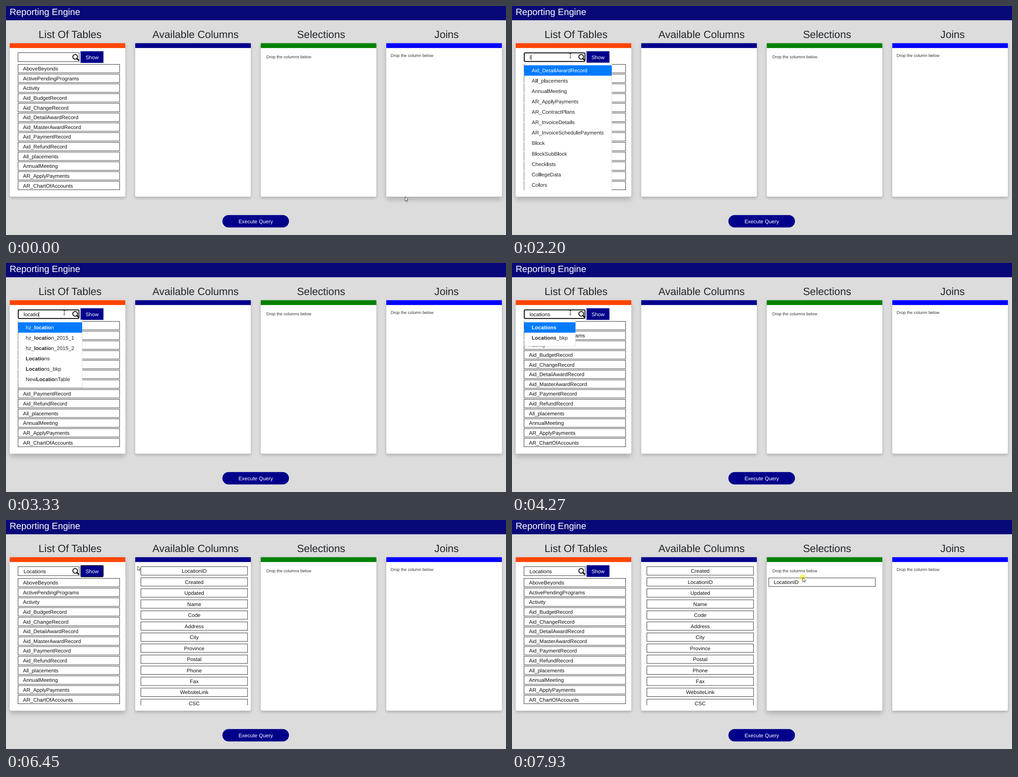
An HTML page with a canvas that plays this animation: 1103x508 px, repeating every 8 s.

```html
<!DOCTYPE html>
<html lang="en">
<head>
<meta charset="utf-8">
<title>Reporting Engine</title>
<style>
html, body { margin: 0; width: 100%; height: 100%; overflow: hidden; background: #dcdcdc; }
canvas { display: block; }
</style>
</head>
<body>
<canvas id="stage" width="1103" height="508"></canvas>
<script>
const ctx = document.getElementById('stage').getContext('2d');
ctx.textRendering = 'geometricPrecision';
const LOOP = 8000;
const FAMILY = '"Liberation Sans", Arial, sans-serif';
const BODY = 11.52;
const BLUE = '#007bff';
const NAVY = '#00008b';
const BOX_H = 18.7;

const panels = [
  ['List Of Tables', '#ff4500'],
  ['Available Columns', NAVY],
  ['Selections', '#008000'],
  ['Joins', '#0000ff']
].map(([title, color], i) => ({ title, color, x: 8.2 + i * 276.9 }));
const PANEL = { w: 255, top: 82.5, body: 93.2, bottom: 423 };

const tables = ['AboveBeyonds', 'ActivePendingPrograms', 'Activity', 'Aid_BudgetRecord',
  'Aid_ChangeRecord', 'Aid_DetailAwardRecord', 'Aid_MasterAwardRecord', 'Aid_PaymentRecord',
  'Aid_RefundRecord', 'All_placements', 'AnnualMeeting', 'AR_ApplyPayments', 'AR_ChartOfAccounts'];
const columns = ['LocationID', 'Created', 'Updated', 'Name', 'Code', 'Address', 'City',
  'Province', 'Postal', 'Phone', 'Fax', 'WebsiteLink', 'CSC'];

// Suggestions: the first letter gives a capped list, later ones filter the rest.
const firstHits = ['Aid_DetailAwardRecord', 'All_placements', 'AnnualMeeting', 'AR_ApplyPayments',
  'AR_ContractPlans', 'AR_InvoiceDetails', 'AR_InvoiceSchedulePayments', 'Block',
  'BlockSubBlock', 'Checklists', 'CollegeData', 'Colors'];
const laterHits = ['Block', 'BlockSubBlock', 'Colors', 'DownloadLog', 'EmailLog', 'hz_location',
  'hz_location_2015_1', 'hz_location_2015_2', 'Locations', 'Locations_bkp', 'NewLocationTable',
  'UploadLog', 'X_TEC_ARByStudentView_Local'];

const WORD = 'locations';
const keyTimes = [2200, 2520, 2690, 2770, 3090, 3170, 3330, 3560, 3710];
const FOCUS = 1010, PICK = 5000, CLOSE = 5170, SHOW = 5890, LOADED = 6040;
const GRAB = 6930, DROP = 7850;

// Pointer moves: start, end, number of steps, target, ease-out powers (none = smooth).
const START = [880, 422.5];
const GRIP = [395.5, 107.5];
const moves = [
  { t0: 70, t1: 840, n: 11, to: [128, 110] },
  { t0: 4440, t1: 4840, n: 6, to: [124, 138] },
  { t0: 5170, t1: 5970, n: 11, to: [176, 110] },
  { t0: 6370, t1: 6450, n: 2, to: [289.8, 101.5] },
  { t0: 6530, t1: 7090, n: 8, to: GRIP, pow: [1.8, 1.8] },
  { t0: 7240, t1: 7930, n: 10, to: [641, 127], pow: [1.65, 5.8] }
];

const smooth = p => p * p * (3 - 2 * p);

function pointerAt(t) {
  let pos = START;
  for (const m of moves) {
    if (t < m.t0) break;
    const step = Math.floor((t - m.t0) / (m.t1 - m.t0) * (m.n - 1) + 0.05) + 1;
    const p = Math.min(1, step / m.n);
    pos = pos.map((from, k) => {
      const e = m.pow ? 1 - Math.pow(1 - p, m.pow[k]) : smooth(p);
      return from + (m.to[k] - from) * e;
    });
  }
  return pos;
}

const inside = ([x, y], l, t, r, b) => x >= l && x <= r && y >= t && y <= b;

// Share of the last 300 ms spent over the panel.
function hoverOf(panel, t) {
  let sum = 0;
  for (let k = 0; k < 6; k++) {
    if (inside(pointerAt(t - k * 60), panel.x, PANEL.top, panel.x + PANEL.w, PANEL.bottom)) sum++;
  }
  return sum / 6;
}

function setFont(size, bold) {
  ctx.font = `${bold ? 'bold ' : ''}${size}px ${FAMILY}`;
}

function text(str, x, y, { size = BODY, color = '#111', align = 'left', bold = false } = {}) {
  setFont(size, bold);
  ctx.fillStyle = color;
  ctx.textAlign = align;
  ctx.fillText(str, x, y);
}

function rect(x, y, w, h, color) {
  ctx.fillStyle = color;
  ctx.fillRect(x, y, w, h);
}

// Coordinates are the centre of the line.
function frame(x, y, w, h, color = '#111', fill) {
  if (fill) rect(x, y, w, h, fill);
  ctx.strokeStyle = color;
  ctx.lineWidth = 0.85;
  ctx.strokeRect(x, y, w, h);
}

function rounded(x, y, w, h, r, fill, stroke, width = 1) {
  ctx.beginPath();
  ctx.roundRect(x, y, w, h, r);
  if (fill) { ctx.fillStyle = fill; ctx.fill(); }
  if (stroke) { ctx.strokeStyle = stroke; ctx.lineWidth = width; ctx.stroke(); }
}

function drawPage(t) {
  rect(0, 0, 1103, 508, '#dcdcdc');
  rect(0, 0, 1103, 31.6, '#080878');
  text('Reporting Engine', 8, 19.7, { size: 20.16, color: '#fff' });
  for (const p of panels) {
    const h = hoverOf(p, t);
    text(p.title, p.x + 133.1, 71, { size: 23.04, color: '#212529', align: 'center' });
    ctx.save();
    ctx.shadowColor = 'rgba(0,0,0,0.22)';
    ctx.shadowBlur = 6 + 6 * h;
    ctx.shadowOffsetY = 3 + 3 * h;
    rounded(p.x, PANEL.top, PANEL.w, PANEL.bottom - PANEL.top, [0, 0, 3, 3], '#fff');
    ctx.restore();
    rect(p.x, PANEL.top, PANEL.w, PANEL.body - PANEL.top, p.color);
  }
  text('Drop the columns below', 574.5, 116, { size: 9.22, color: '#333' });
  text('Drop the column below', 848.5, 113, { size: 9.22, color: '#333' });
  rounded(477.4, 463.8, 146.8, 27.4, 13.7, NAVY);
  text('Execute Query', 551, 482, { color: '#fff', align: 'center' });
}

function drawSearch(t, typed) {
  const focused = t >= FOCUS && t < PICK;
  if (focused) rounded(27, 104, 134, 19, 2, '#fff', '#101010', 2);
  else frame(26.4, 103.6, 135, 19.9, '#111', '#fff');
  const value = t >= CLOSE ? 'Locations' : typed;
  text(value, 38.8, 117.7);
  if (focused) {
    const since = typed ? keyTimes[typed.length - 1] : 1085;
    if (Math.floor(Math.max(0, t - since) / 555) % 2 === 0) {
      rect(Math.round(39 + ctx.measureText(value).width), 108, 1, 12, '#111');
    }
  }

  ctx.strokeStyle = '#111';
  ctx.lineCap = 'round';
  ctx.lineWidth = 2;
  ctx.beginPath();
  ctx.arc(152.6, 112.8, 5.2, 0, 7);
  ctx.stroke();
  ctx.lineWidth = 3;
  ctx.beginPath();
  ctx.moveTo(156.8, 117);
  ctx.lineTo(159.7, 120);
  ctx.stroke();
  ctx.lineCap = 'butt';

  if (t >= SHOW && t < GRAB + 70) rounded(165, 101, 49.5, 25, 2, NAVY, '#080820', 1.5);
  else rect(164.4, 100.4, 50.6, 25.8, NAVY);
  text('Show', 189.8, 117.7, { color: '#fff', align: 'center' });
}

function drawTables() {
  tables.forEach((name, i) => {
    const y = 129.5 + i * 21.62;
    frame(26.4, y, 224.3, BOX_H, '#111', '#fff');
    text(name, 37.5, y + 13.6);
  });
}

function drawColumns(t) {
  if (t < LOADED) return;
  const dropped = t >= DROP;
  const names = dropped ? ['Created', 'LocationID', ...columns.slice(2)] : columns;
  const [px] = pointerAt(t);
  const lit = !dropped && (t >= GRAB || px > 297);
  ctx.save();
  ctx.beginPath();
  ctx.rect(285, 93, 255, 318);
  ctx.clip();
  names.forEach((name, i) => {
    const y = 103.6 + i * 24.48;
    frame(297.6, y, 235.2, BOX_H, '#111', i === 0 && lit ? BLUE : '#fff');
    text(name, 415.2, y + 13.6, { align: 'center' });
  });
  ctx.restore();
}

function drawDragged(t) {
  if (t < 7240) return;
  let x = 566.3, y = 128.6;
  if (t < DROP) {
    const [px, py] = pointerAt(t);
    x = 297.6 + px - GRIP[0];
    y = 103.6 + py - GRIP[1];
  }
  frame(x, y, 235.2, BOX_H, '#111', t < DROP ? null : '#fff');
  text('LocationID', x + 11, y + 13.4);
}

// Splits a name into plain and matching runs.
function runs(name, query) {
  return name.split(new RegExp(`(${query})`, 'ig'))
    .map((str, i) => ({ str, bold: i % 2 === 1 }));
}

function runWidth({ str, bold }) {
  setFont(BODY, bold);
  return ctx.measureText(str).width;
}

function drawSuggestions(t, typed) {
  if (!typed || t >= CLOSE) return;
  const pool = typed.length === 1 ? firstHits : laterHits;
  const hits = pool.filter(n => n.toLowerCase().includes(typed)).map(n => runs(n, typed));
  const widest = Math.max(...hits.map(h => h.reduce((w, r) => w + runWidth(r), 0)));
  const right = Math.round(43.5 + widest + 17.3);
  const rowH = 23.07, top = 131.5;
  ctx.save();
  ctx.beginPath();
  ctx.rect(20, 125, 240, 286);
  ctx.clip();
  frame(27, 126, right - 27, hits.length * rowH + 12.2, '#d8d8d8', '#fff');
  rect(27, top, right - 27, rowH, BLUE);
  hits.forEach((hit, i) => {
    let x = 43.5;
    for (const run of hit) {
      text(run.str, x, 147 + i * rowH, { bold: run.bold, color: i ? '#212529' : '#fff' });
      x += runWidth(run);
    }
  });
  ctx.restore();
}

function drawClick(t, [x, y]) {
  const clicks = [[FOCUS, 1240], [PICK, CLOSE], [SHOW, 6120], [GRAB, LOOP]];
  const hit = clicks.find(([a, b]) => t >= a && t < b);
  if (!hit) return;
  const fade = Math.min(1, (hit[1] - t) / 200);
  ctx.fillStyle = `rgba(248,232,25,${0.4 + 0.45 * fade})`;
  ctx.beginPath();
  ctx.arc(x, y + 0.5, 7, 0, 7);
  ctx.fill();
}

function drawPointer(pos) {
  const [x, y] = pos;
  ctx.lineWidth = 1;
  if (inside(pos, 26, 103, 145, 124)) {
    ctx.strokeStyle = '#333';
    ctx.beginPath();
    ctx.moveTo(x - 1.5, y - 4.5);
    ctx.lineTo(x + 2.5, y - 4.5);
    ctx.moveTo(x + 0.5, y - 4.5);
    ctx.lineTo(x + 0.5, y + 5);
    ctx.moveTo(x - 1.5, y + 5);
    ctx.lineTo(x + 2.5, y + 5);
    ctx.stroke();
    return;
  }
  const shape = [[0, 0], [0, 9.8], [2.2, 7.8], [3.7, 11], [5.2, 10.3], [3.8, 7.2], [6.6, 7]];
  ctx.beginPath();
  shape.forEach(([dx, dy]) => ctx.lineTo(x + 0.5 + dx, y + 0.5 + dy));
  ctx.closePath();
  ctx.fillStyle = '#fff';
  ctx.fill();
  ctx.strokeStyle = '#333';
  ctx.lineWidth = 0.9;
  ctx.stroke();
}

function draw(t) {
  const typed = WORD.slice(0, keyTimes.filter(k => t >= k).length);
  const pos = pointerAt(t);
  drawPage(t);
  drawTables();
  drawSearch(t, typed);
  drawColumns(t);
  drawSuggestions(t, typed);
  drawDragged(t);
  drawClick(t, pos);
  drawPointer(pos);
}

const begin = performance.now();
function tick() {
  draw((performance.now() - begin) % LOOP);
  requestAnimationFrame(tick);
}
tick();
</script>
</body>
</html>
```
